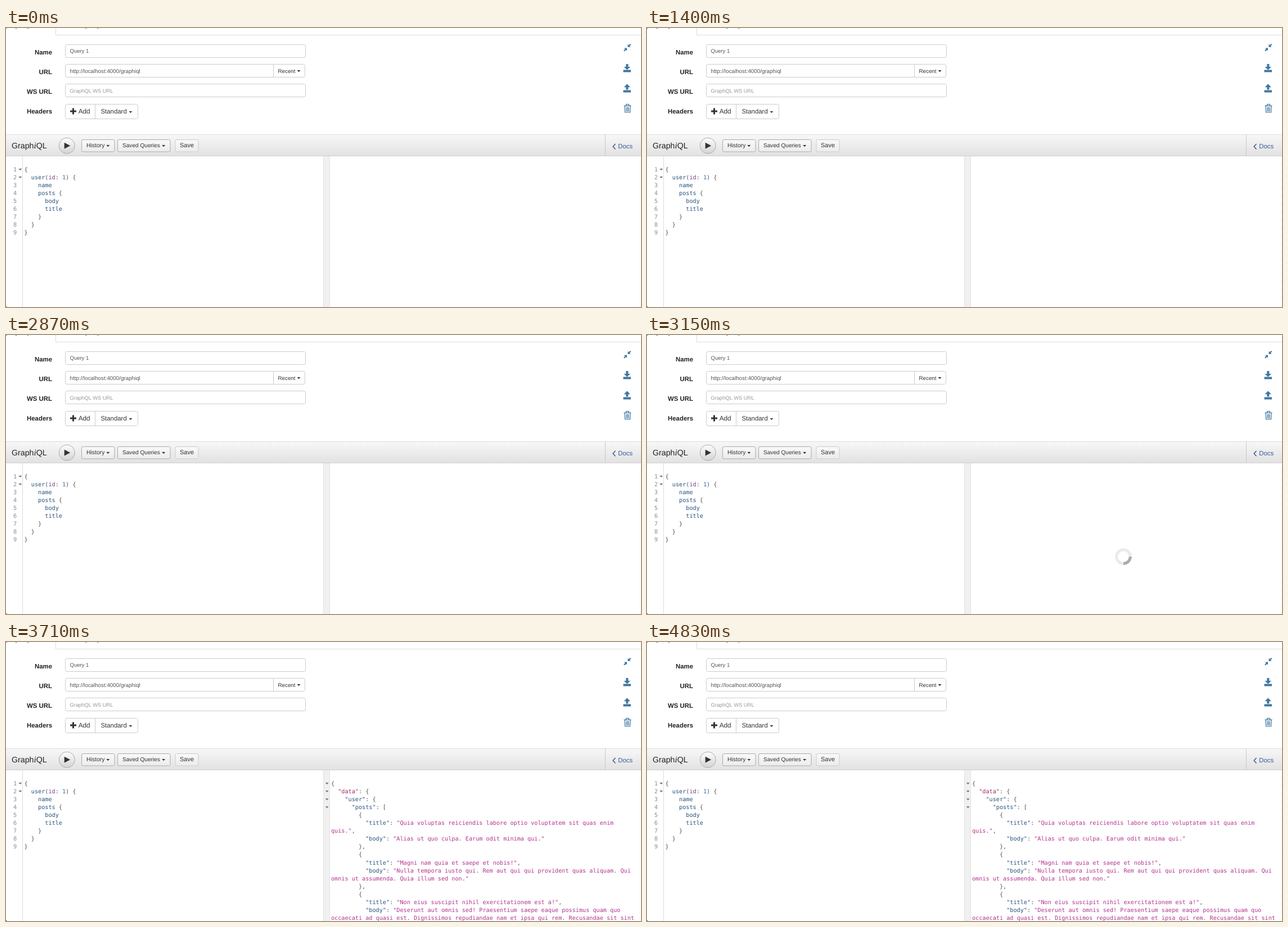
An HTML page for the animation above (4.9 s loop, 1129 px wide and 496 px high).

```html
<!DOCTYPE html>
<html lang="en">
<head>
<meta charset="utf-8">
<title>GraphiQL workspace</title>
<style>
  html, body { margin: 0; width: 100%; height: 100%; overflow: hidden; background: #fff; }
  svg { display: block; width: 100%; height: 100%; }
  text { font-family: "Liberation Sans", Arial, sans-serif; white-space: pre; text-rendering: geometricPrecision; }
  .mono text { font-family: "DejaVu Sans Mono", monospace; font-size: 10.18px; }
</style>
</head>
<body>
<svg id="stage" viewBox="0 0 1129 496" xmlns="http://www.w3.org/2000/svg">
  <defs>
    <linearGradient id="bar" x2="0" y2="1"><stop stop-color="#f7f7f7"/><stop offset="1" stop-color="#e2e2e2"/></linearGradient>
    <linearGradient id="btn" x2="0" y2="1"><stop stop-color="#f9f9f9"/><stop offset="1" stop-color="#ececec"/></linearGradient>
    <linearGradient id="run" x2="0" y2="1"><stop stop-color="#fdfdfd"/><stop offset="1" stop-color="#d2d3d6"/></linearGradient>
  </defs>
  <g id="form"></g>
  <g id="toolbar"></g>
  <g id="panes" class="mono"></g>
  <g id="result" class="mono"></g>
  <g id="folds"></g>
  <g id="spinner" fill="none" stroke="#969696" stroke-width="5">
    <circle r="12.3" stroke-opacity=".2"/>
    <path d="M-8.7-8.7A12.3 12.3 0 0 1 8.7-8.7" stroke-opacity=".75"/>
  </g>
</svg>
<script>
const LOOP = 4900, STEP = 70;
const SPIN_AT = 2940, RESULT_AT = 3220, FOLDS_AT = 3640;
const LINE = 14.11, BASE = 254.5;
const COLORS = { prop: '#26527f', string: '#b2328e', def: '#a0295a', attr: '#7a3e8e', number: '#3a70a8', punct: '#555' };

const QUERY = `{
  user(id: 1) {
    name
    posts {
      body
      title
    }
  }
}`;

const RESPONSE = `{
  "data": {
    "user": {
      "posts": [
        {
          "title": "Quia voluptas reiciendis labore optio voluptatem sit quas enim
quis.",
          "body": "Alias ut quo culpa. Earum odit minima qui."
        },
        {
          "title": "Magni nam quia et saepe et nobis!",
          "body": "Nulla tempora iusto qui. Rem aut qui qui provident quas aliquam. Qui
omnis ut assumenda. Quia illum sed non."
        },
        {
          "title": "Non eius suscipit nihil exercitationem est a!",
          "body": "Deserunt aut omnis sed! Praesentium saepe eaque possimus quam quo
occaecati ad quasi est. Dignissimos repudiandae nam et ipsa qui rem. Recusandae sit sint`;

const $ = id => document.getElementById(id);
const escapeText = s => s.replace(/&/g, '&amp;').replace(/</g, '&lt;');
const text = (x, y, size, s, fill = '#333', extra = '') =>
  `<text x="${x}" y="${y}" font-size="${size}" fill="${fill}" ${extra}>${s}</text>`;
const box = (x, y, w, h, stroke = '#ccc', fill = '#fff', r = 3) =>
  `<rect x="${x}" y="${y}" width="${w}" height="${h}" rx="${r}" fill="${fill}" stroke="${stroke}"/>`;
const rect = (x, y, w, h, fill) => `<rect x="${x}" y="${y}" width="${w}" height="${h}" fill="${fill}"/>`;
const path = (d, fill = '#333', extra = '') => `<path d="${d}" fill="${fill}" ${extra}/>`;
const caret = (x, y, fill = '#333') => path(`M${x - 3} ${y - 1.5}h6l-3 3.2z`, fill);

function tokenKind(token, rest) {
  if (token === '"data"') return 'def';
  if (token[0] === '"') return rest[0] === ':' ? 'prop' : 'string';
  if (token === 'id') return 'attr';
  if (/^\d/.test(token)) return 'number';
  return /^\w/.test(token) ? 'prop' : 'punct';
}

function codeLines(source, x) {
  const lines = [''];
  for (const m of source.matchAll(/"[^"]*"?|\w+|\n|[^\w"\n]+/g)) {
    const fill = COLORS[tokenKind(m[0], source.slice(m.index + m[0].length))];
    m[0].split('\n').forEach((part, i) => {
      if (i) lines.push('');
      if (part) lines[lines.length - 1] += `<tspan fill="${fill}">${escapeText(part)}</tspan>`;
    });
  }
  return lines.map((s, i) => `<text x="${x}" y="${BASE + i * LINE}">${s}</text>`).join('');
}

function drawForm() {
  const label = (y, s) => text(82, y, 11.4, s, '#222', 'font-weight="700" text-anchor="end"');
  const blue = '#41779f';
  const tray = y => rect(1097.5, y, 13.5, 4, blue);
  return text(12, -1, 11.5, 'Query 1', '#555') + text(110, -1, 11.5, 'New Query', '#41779f') +
    path('M0 0h2.5l-2.5 1.5z', '#777') +
    path('M88.5 0V12.5H1129', 'none', 'stroke="#ddd"') +
    label(46.5, 'Name') + label(81.7, 'URL') + label(117, 'WS URL') + label(152.3, 'Headers') +
    box(105.5, 29.5, 427, 23) + text(113.5, 44.2, 9.5, 'Query 1', '#555') +
    box(105.5, 64.5, 426, 23) + path('M475.5 65V87', 'none', 'stroke="#ccc"') +
    text(113.5, 79.5, 9.8, 'http://localhost:4000/graphiql', '#555') +
    text(483.5, 79.6, 9.8, 'Recent') + caret(520.5, 76.5) +
    box(105.5, 99.5, 427, 23) + text(113.5, 114.6, 9.35, 'GraphQL WS URL', '#999') +
    box(105.5, 135.5, 129, 26) + path('M158.5 136V161', 'none', 'stroke="#ccc"') +
    path('M119.5 142.5V153.5M114 148H125', 'none', 'stroke="#333" stroke-width="3"') +
    text(128.7, 152.3, 11.8, 'Add') + text(168.5, 152.3, 11.4, 'Standard') + caret(221.5, 149.4) +
    path('M1105.5 34V28.8l1.7 1.7 2.6-2.6 1.6 1.6-2.6 2.6 1.7 1.7zM1104 35.5v5.2l-1.7-1.7-2.6 2.6-1.6-1.6 2.6-2.6-1.7-1.7z', blue) +
    path('M1102.3 64h4v5h3.7l-5.7 5.6-5.7-5.6h3.7z', blue) + tray(74.5) +
    path('M1102.3 109.5h4v-4.3h3.7l-5.7-5.6-5.7 5.6h3.7z', blue) + tray(110.5) +
    path('M1098.5 138.3h13M1102.5 138v-2.3h5v2.3M1100 139l.6 11h9l.6-11M1103 140.5v8M1105.1 140.5v8M1107.2 140.5v8',
      'none', `stroke="${blue}" stroke-width="1.2"`);
}

function drawToolbar() {
  const button = (x, w, stroke) => box(x, 198.5, w, 21.5, stroke, 'url(#btn)', 2.5);
  return rect(0, 190, 1129, 37, 'url(#bar)') +
    path('M0 189.5H1129', 'none', 'stroke="#ddd"') +
    path('M0 227.5H1129', 'none', 'stroke="#d0d0d0"') +
    path('M1065.5 190V227', 'none', 'stroke="#c8c8c8"') +
    text(10, 214.2, 14.2, 'Graph<tspan font-family="Liberation Serif, serif" font-style="italic" font-size="15.6">i</tspan>QL', '#222') +
    '<circle cx="108.3" cy="209.3" r="14" fill="url(#run)" stroke="#aaa"/>' +
    path('M103.7 203.8l10.5 5.4-10.5 5.6z', '#333') +
    button(134.5, 58.5, '#aaa') + text(143, 212.2, 10.4, 'History') + caret(181.3, 209.5) +
    button(198.5, 93.5, '#aaa') + text(207, 212.2, 10.1, 'Saved Queries') + caret(280.2, 209.5) +
    button(301, 41, '#ccc') + text(309, 212.2, 11, 'Save') +
    path('M1083.5 206l-4.3 4.7 4.3 4.7', 'none', 'stroke="#3b5998" stroke-width="1.5"') +
    text(1088.2, 214, 11.4, 'Docs', '#3b5998');
}

function drawPanes() {
  let out = path('M29.5 228V496', 'none', 'stroke="#ddd"') +
    rect(564.5, 228, 11, 268, '#f0f0f0') +
    path('M564.5 228V496M575.5 228V496', 'none', 'stroke="#e2e2e2"') +
    path('M1127.5 238V496', 'none', 'stroke="#f3f3f3" stroke-dasharray="10 4"') +
    path('M0 494v2h2z', '#666');
  for (let i = 0; i < 9; i++) out += `<text x="13" y="${BASE + i * LINE}" fill="#8c8c8c">${i + 1}</text>`;
  return out + foldMarks(25.3, 2) + codeLines(QUERY, 32.6);
}

function foldMarks(x, count) {
  return Array.from({ length: count }, (_, i) => caret(x, 251.5 + i * LINE, '#777')).join('');
}

$('form').innerHTML = drawForm();
$('toolbar').innerHTML = drawToolbar();
$('panes').innerHTML = drawPanes();
$('result').innerHTML = codeLines(RESPONSE, 578);
$('folds').innerHTML = foldMarks(570.7, 4);

function show(id, on) {
  $(id).setAttribute('display', on ? 'inline' : 'none');
}

function render(ms) {
  const t = Math.floor(ms % LOOP / STEP) * STEP;
  show('spinner', t >= SPIN_AT && t < RESULT_AT);
  show('result', t >= RESULT_AT);
  show('folds', t >= FOLDS_AT);
  // One turn takes 600 ms.
  $('spinner').setAttribute('transform', `translate(847 394) rotate(${(t - SPIN_AT) * 0.6 + 9})`);
}

const start = performance.now();
function tick() {
  render(performance.now() - start);
  requestAnimationFrame(tick);
}
tick();
</script>
</body>
</html>
```
